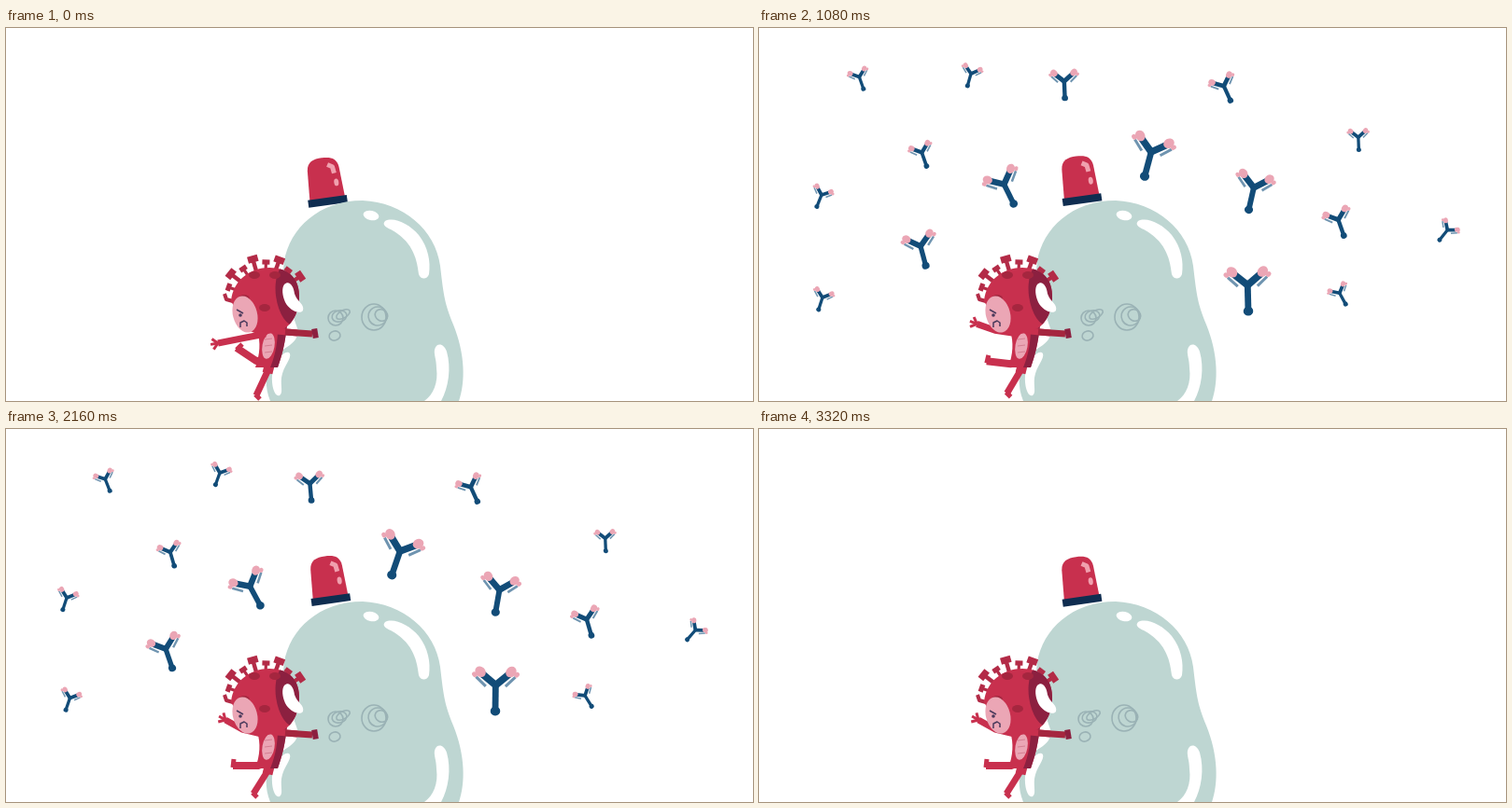
Recreate the animation shown at these times as an HTML page with a canvas. Size 800 by 400 pixels, loop 3.36 s.

```html
<!DOCTYPE html>
<html>
<head>
<meta charset="utf-8">
<style>
html, body { margin: 0; width: 100%; height: 100%; overflow: hidden; background: #fff }
canvas { display: block }
</style>
</head>
<body>
<canvas id="stage" width="800" height="400"></canvas>
<script>
const g = document.getElementById('stage').getContext('2d');
const LOOP = 3360, TAU = 2 * Math.PI, RAD = Math.PI / 180;
const RED = '#c8304e', CROWN = '#b32b47', DARK = '#8c2040', SPOT = '#a5263f', PINK = '#eba6b5', GLOSS = '#f0a0ae';
const NAVY = '#0f2d50', BLUE = '#124c78', CHAIN = '#6f94b0', CELL = '#bed6d2', INK = '#4b3a5c', SCRIBBLE = '#9ab2b5';

// x, y, size, angle
const near = [
  [262, 168, 26, -27], [421, 132, 30, 17], [529, 172, 27, 11], [642, 117, 15, -2],
  [621, 205, 20, -18], [172, 235, 24, -17], [524, 275, 31, 0]
];
const far = [
  [107, 53, 15, -20], [228, 48, 15, 18], [326, 58, 20, -4], [498, 62, 19, -24], [175, 133, 17, -18],
  [66, 180, 15, 20], [738, 216, 15, 40], [68, 289, 15, 18], [621, 285, 15, -30]
];

const cell = new Path2D('M283 400C277 385 277 368 285 354C296 342 315 340 312 322C305 300 294 275 298 250C304 215 335 185 382 185C425 187 460 216 465 255C469 290 470 295 479 318C492 350 492 380 485 400Z');
const shine = new Path2D('M406 207C415 202 432 210 442 222C452 235 455 250 453 264C451 270 444 270 442 264C440 245 434 228 412 216C405 213 403 210 406 207ZM459 345C461 337 469 338 472 347C477 365 474 385 466 400L448 400C458 393 463 380 461 365C461 355 458 350 459 345ZM304 349C299 343 287 358 285 372C284 385 288 396 293 394C297 391 294 385 295 375C297 362 306 355 304 349Z');
const head = new Path2D('M241 293C243 270 262 257 282 257C302 257 315 268 314 290C313 312 301 325 285 327C275 329 265 329 258 322Z');
const torso = new Path2D('M269 325L301 318C299 337 296 350 291 364L267 364C272 350 273 337 269 325Z');
const shade = new Path2D('M291 322L301 318C299 338 296 350 291 364L283 364C289 350 291 335 291 322Z');
const reflection = new Path2D('M298 275C303 270 308 276 309 285C312 294 320 296 318 303C314 308 303 302 299 294C296 287 295 279 298 275Z');
const dome = new Path2D('M-19-3L-17-36C-16-46-9-48 0-48C9-48 16-46 17-36L19-3Z');

const ramp = (t, a, b) => Math.max(0, Math.min(1, (t - a) / (b - a)));
const ease = p => p * p * (3 - 2 * p);
const wave = (t, period, start) => Math.cos(TAU * (t - start) / period);

function line(color, width, ...pts) {
  g.beginPath();
  for (let i = 0; i < pts.length; i += 2) g.lineTo(pts[i], pts[i + 1]);
  g.strokeStyle = color;
  g.lineWidth = width;
  g.stroke();
}

function oval(color, x, y, rx, ry, angle = 0, width = 0) {
  g.beginPath();
  g.ellipse(x, y, rx, ry, angle * RAD, 0, TAU);
  g.fillStyle = g.strokeStyle = color;
  g.lineWidth = width;
  width ? g.stroke() : g.fill();
}

function fill(color, path) {
  g.fillStyle = color;
  g.fill(path);
}

function placed(x, y, angle, draw) {
  g.save();
  g.translate(x, y);
  g.rotate(angle * RAD);
  draw();
  g.restore();
}

function swarm(list, t, alpha) {
  g.globalAlpha = alpha;
  list.forEach(([x, y, size, angle], i) => {
    const sway = Math.sin(t / 400 + i * 2.3);
    placed(x + sway, y - sway, angle + 2 * sway, () => {
      g.scale(size, size);
      for (const s of [-1, 1]) {
        line(CHAIN, .1, s * .34, .04, s * .68, -.28);
        oval(PINK, s * .73, -.36, .08, .1, s * 45);
        line(BLUE, .25, 0, 0, s * .46, -.38);
        oval(PINK, s * .53, -.46, .17, .2, s * 45);
      }
      line(BLUE, .22, 0, -.08, 0, .9);
      oval(BLUE, 0, .9, .17, .16);
    });
  });
  g.globalAlpha = 1;
}

function lamp(t) {
  const x = 346.4 + 1.7 * wave(t, 880, 440), y = 185.5 + 1.5 * wave(t, 1380, 100);
  placed(x, y, -8, () => {
    fill(RED, dome);
    g.fillStyle = NAVY;
    g.fillRect(-21, -5, 42, 8);
    line(GLOSS, 5, 5, -40, 10, -37, 11, -30);
    oval(GLOSS, 12, -20, 2.5, 4);
  });
}

function scribbles(t) {
  placed(-3 * ramp(t, 2160, 3320), 0, 0, () => {
    for (let i = 0; i < 3; i++) {
      oval(SCRIBBLE, 353 + 4 * i, 311 - 2 * i, 8, 8 - 2 * i, -15 * i, 1.6);
      oval(SCRIBBLE, 394 + 4 * i, 310 - i, 13 - 3 * i, 14 - 4 * i, 15 * i, 1.6);
    }
    oval(SCRIBBLE, 352, 330, 6, 5, -15, 1.6);
  });
}

function crown() {
  for (let i = 0; i < 8; i++) {
    const big = i % 2, r = big ? 46 : 41, w = big ? 5.5 : 4;
    placed(277, 292, 290 + 18 * i, () => {
      line(CROWN, w * .8, 0, -30, 0, -r);
      line(CROWN, w * 1.3, -w, -r, w, -r);
    });
  }
}

function virus(t) {
  const raise = ease(ramp(t, 500, 1320));
  const mix = (a, b) => a + (b - a) * raise;

  // legs
  const toeX = mix(268, 265), toeY = mix(394, 391);
  line(RED, 11, 285, 350, 280, 370);
  line(RED, 7, 282, 364, toeX, toeY);
  line(RED, 5, toeX - 1, toeY - 1, toeX + 4, toeY + 4);
  const footX = mix(247, 243), footY = mix(343, 361);
  line(RED, 8, 283, 356, mix(268, 270), mix(357, 361), footX, footY);
  line(RED, 5, footX, footY + 2, mix(253, 244), mix(339, 354));

  // torso and far arm
  fill(RED, torso);
  fill(DARK, shade);
  line(RED, 7, 290, 325, 312, 327);
  line(SPOT, 7, 299, 326, 328, 328);
  line(DARK, 10, 328, 328, 334, 327);
  oval(PINK, 281, 341, 6.5, 14, 10);
  for (let y = 334; y < 350; y += 7) line('#d47f92', 1, 277, y, 285, y - 1);

  crown();
  line(CROWN, 4, 243, 293, 236, 291, 234, 285);
  fill(RED, head);
  g.save();
  g.clip(head);
  oval(DARK, 306, 286, 17, 34, -8);
  for (let i = 0; i < 4; i++) oval(SPOT, 255 + 11 * i, i % 2 ? 265 : 290 + 5 * i, 6, 4);
  g.restore();

  // near arm with fingers
  const handX = mix(227, 235), handY = mix(338, 312);
  line(RED, 7, 278, 328, mix(252, 253), mix(333, 322), handX, handY);
  for (let a = -45; a <= 45; a += 45) {
    const d = (mix(170, 210) + a) * RAD;
    line(RED, 3, handX, handY, handX + 8 * Math.cos(d), handY + 8 * Math.sin(d));
  }

  // face
  oval(PINK, 256, 307, 13, 20, -15);
  line(INK, 1.6, 247, 302, 254, 306);
  oval(INK, 251, 308, 1.8, 1.8);
  line(INK, 1.5, 251, 321, 251, 316, 255, 314, 258, 316, 258, 320);

  fill('#fff', reflection);
}

function frame(now) {
  const t = now % LOOP;
  g.fillStyle = '#fff';
  g.fillRect(0, 0, 800, 400);
  swarm(far, t, ramp(t, 340, 860) * (1 - ramp(t, 2460, 2900)));
  swarm(near, t, ramp(t, 140, 560) * (1 - ramp(t, 2600, 3040)));
  lamp(t);
  fill(CELL, cell);
  fill('#fff', shine);
  oval('#fff', 391, 201, 8.5, 5, 12);
  scribbles(t);
  virus(t);
  requestAnimationFrame(frame);
}

g.lineJoin = 'round';
requestAnimationFrame(frame);
</script>
</body>
</html>
```
